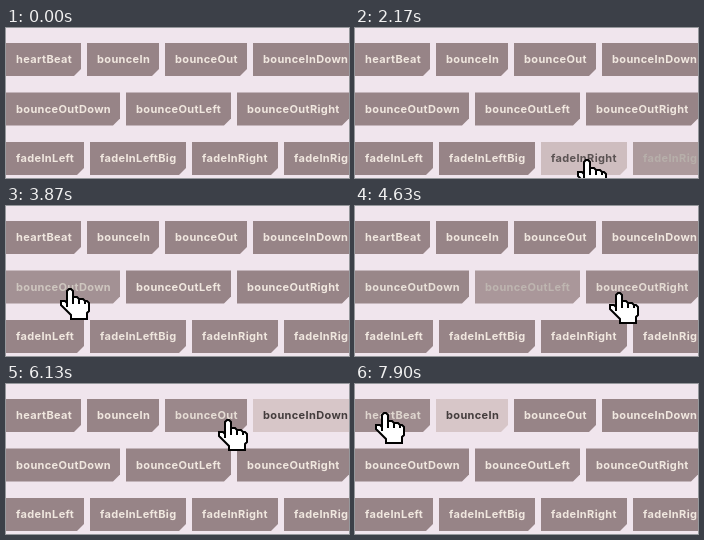
Write an HTML page that moves like this. It is 343 by 150 pixels and loops after 8 s.

```html
<!DOCTYPE html>
<html>
<head>
<meta charset="utf-8">
<style>
  html, body { margin: 0; height: 100%; overflow: hidden; background: #f0e5ed; }
  svg { display: block; }
  text { font: 700 11px Inter, sans-serif; letter-spacing: .35px; }
</style>
</head>
<body>
<svg width="343" height="150" viewBox="0 0 343 150">
  <g id="buttons"></g>
  <g id="hand">
    <path transform="scale(2)" fill="#fff" stroke="#000" d="M3.5 9.5V1.5L4.5 .5H5.5L6.5 1.5V4.5H8.5L9.5 5.5H11.5L12.5 6.5H13.5L14.5 7.5V11.5L13.5 12.5V15.5H5.5V13.5L1.5 9.5L.5 8.5V6.5H2.5L3.5 7.5M6.5 4.5V8M9.5 5.5V8M12.5 6.5V8"/>
  </g>
</svg>
<script>
const LOOP = 8000, START = 830;
const STEP = 10, FADE_IN = 700, FADE_OUT = 900;
const TOP = 15, PITCH = 49.5, HEIGHT = 33, GAP = 6, PADDING = 10, CUT = 7;
const FILL = [[151, 132, 135], [220, 203, 205]];
const INK = [[240, 231, 223], [54, 47, 48]];

// Labels with button widths
const rows = [
  { heartBeat: 75, bounceIn: 72, bounceOut: 82, bounceInDown: 105 },
  { bounceOutDown: 114, bounceOutLeft: 105, bounceOutRight: 112 },
  { fadeInLeft: 78, fadeInLeftBig: 96, fadeInRight: 86, fadeInRightBig: 106 }
];

// Fingertip key points: time, x, y
const path = [
  [START, 303, 147], [930, 303, 142], [1070, 303, 142], [1600, 278, 136],
  [2170, 232, 131], [2700, 161, 129], [3330, 55, 124], [3540, 27, 107],
  [3680, 31, 98], [3870, 64, 82], [4150, 114, 80], [4630, 264, 86],
  [4900, 304, 75], [5200, 300, 39], [5450, 290, 29], [6030, 243, 33],
  [6130, 222, 35], [7700, 100, 31], [7900, 30, 28]
];

const lerp = (a, b, k) => a + (b - a) * k;
const clamp = k => Math.min(1, Math.max(0, k));
const smooth = k => k * k * (3 - 2 * k);
const mix = ([a, b], k) => `rgb(${a.map((v, i) => Math.round(lerp(v, b[i], k)))})`;

function fingertip(t) {
  const i = Math.max(1, path.findIndex(point => point[0] > t));
  if (t >= path[path.length - 1][0]) return path[path.length - 1].slice(1);
  const [t0, x0, y0] = path[i - 1], [t1, x1, y1] = path[i];
  const k = clamp((t - t0) / (t1 - t0));
  return [lerp(x0, x1, k), lerp(y0, y1, k)];
}

// Hover progress over the loop: rises while the fingertip is inside, then falls
function hoverLevels(x, y, w) {
  const levels = [];
  let progress = 0;
  for (let t = 0; t <= LOOP; t += STEP) {
    const [px, py] = fingertip(t);
    const inside = t >= START && px >= x && px < x + w && py >= y && py < y + HEIGHT;
    progress = clamp(progress + (inside ? STEP / FADE_IN : -STEP / FADE_OUT));
    levels.push(smooth(progress));
  }
  return levels;
}

function add(tag, attributes) {
  const node = document.createElementNS('http://www.w3.org/2000/svg', tag);
  for (const name in attributes) node.setAttribute(name, attributes[name]);
  return document.getElementById('buttons').appendChild(node);
}

const buttons = rows.flatMap((row, r) => {
  const y = TOP + r * PITCH;
  let next = 0;
  return Object.entries(row).map(([label, w]) => {
    const x = next;
    next += w + GAP;
    const box = add('path', {
      d: `M${x} ${y}h${w}v${HEIGHT - CUT}l${-CUT} ${CUT}H${x}Z`
    });
    const text = add('text', { x: x + PADDING, y: Math.floor(y + 20.8) });
    text.textContent = label;
    return { box, text, levels: hoverLevels(x, y, w) };
  });
});
const hand = document.getElementById('hand');

function draw(now) {
  const t = now % LOOP;
  for (const { box, text, levels } of buttons) {
    const level = levels[Math.floor(t / STEP)];
    box.setAttribute('fill', mix(FILL, level));
    text.setAttribute('fill', mix(INK, level));
  }
  const [x, y] = fingertip(t).map(Math.round);
  hand.setAttribute('transform', `translate(${x - 10} ${y})`);
  hand.setAttribute('visibility', t < START ? 'hidden' : 'visible');
  requestAnimationFrame(draw);
}
requestAnimationFrame(draw);
</script>
</body>
</html>
```
